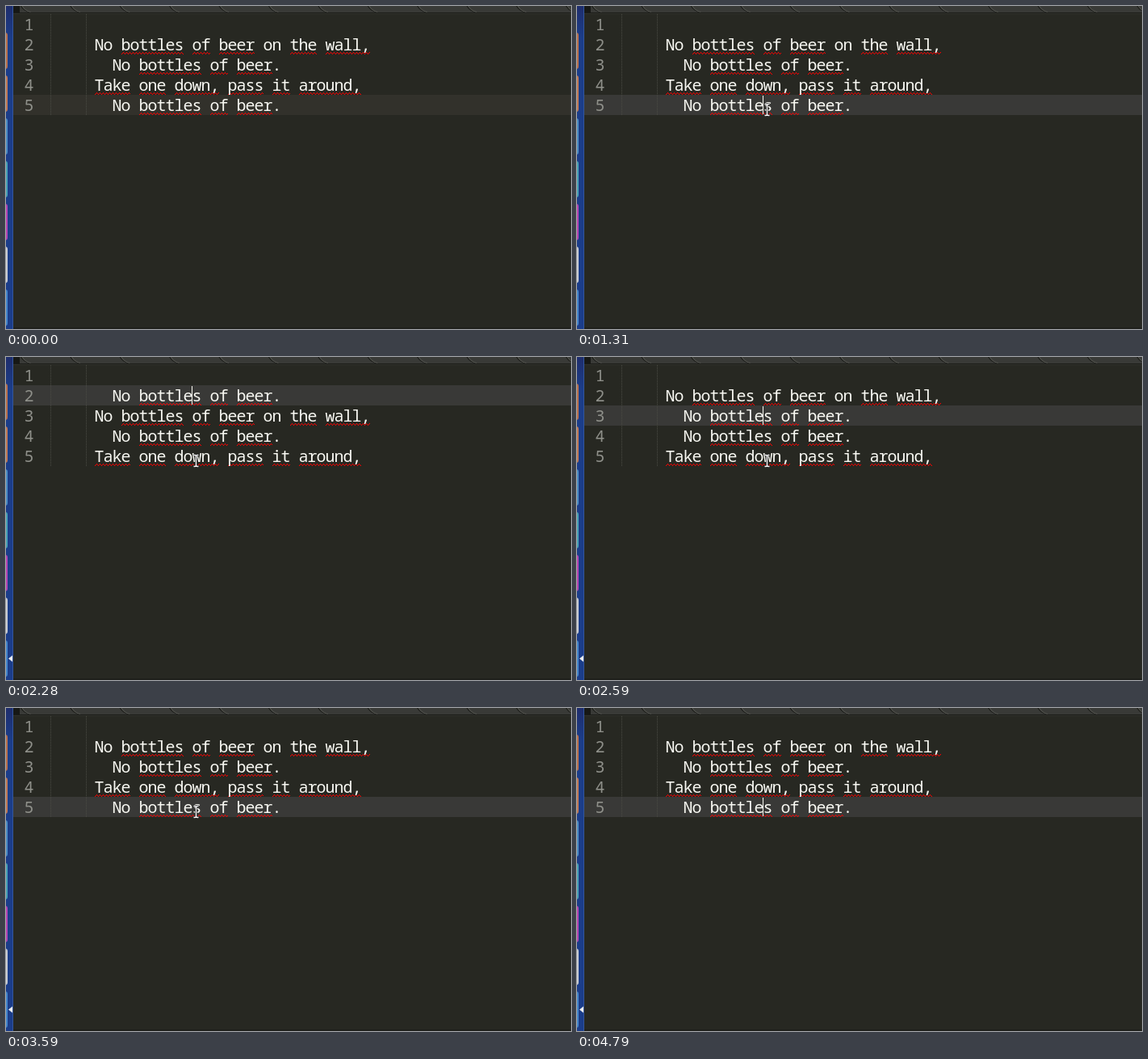
An HTML page with a canvas that plays this animation: 700 by 400 pixels, repeating every 4890 ms.

```html
<!DOCTYPE html>
<html lang="en">
<head>
<meta charset="utf-8">
<title>Moving a line</title>
<style>
html, body { margin: 0; width: 100%; height: 100%; overflow: hidden; background: #272822; }
canvas { display: block; }
</style>
</head>
<body>
<canvas id="stage" width="700" height="400"></canvas>
<script>
const ctx = document.getElementById('stage').getContext('2d');
const LOOP = 4890, CELL = 11, ROW = 25, TOP = 10, LEFT = 55;
const FOCUS = 1310, BADGE = 1400;

const chorus = { indent: 7, text: 'No bottles of beer.' };
const wall = { indent: 5, text: 'No bottles of beer on the wall,' };
const take = { indent: 5, text: 'Take one down, pass it around,' };
const others = [{ indent: 5, text: '' }, wall, chorus, take];

// [time, row of the moved line]; each entry restarts the caret blink
const moves = [[0, 4], [1400, 4], [1950, 3], [2170, 2], [2280, 1], [2590, 2], [2740, 3], [2920, 4]];

// [time, x, y] of the mouse pointer
const entering = [[400, 80, 373], [900, 248, 92], [940, 248, 92], [1260, 235, 128]];
const leaving = [[4045, 235, 128], [4610, 32, 375]];

const clamp = v => Math.max(0, Math.min(1, v));

function rect(color, x, y, w, h) {
  ctx.fillStyle = color;
  ctx.fillRect(x, y, w, h);
}

function follow(path, t) {
  const next = path.findIndex(p => p[0] > t);
  if (next < 1) return path[next ? path.length - 1 : 0].slice(1);
  const [a, b] = [path[next - 1], path[next]];
  const k = (t - a[0]) / (b[0] - a[0]);
  const e = k * k * (3 - 2 * k);
  return [1, 2].map(i => Math.round(a[i] + (b[i] - a[i]) * e));
}

function launcher(active) {
  const blue = ctx.createLinearGradient(0, 0, 0, 40);
  blue.addColorStop(0, '#1f2d6c');
  blue.addColorStop(1, '#1b3d8a');
  rect(blue, 0, 0, 9, 400);
  rect('#34579c', 8, 0, 1, 400);
  ['#b9714c', '#c07a55', '#4f8fc4', '#4aa3b5', '#b546b4', '#c9ccd2', '#4688cc'].forEach((color, i) => {
    ctx.fillStyle = color;
    ctx.beginPath();
    ctx.roundRect(-10, 33 + 53 * i, 12, 45, 3);
    ctx.fill();
  });
  if (active) {
    ctx.fillStyle = '#eee';
    ctx.beginPath();
    ctx.moveTo(3, 373.5);
    ctx.lineTo(8, 369.5);
    ctx.lineTo(8, 377.5);
    ctx.fill();
  }
}

function tabs() {
  rect('#393a37', 9, 0, 691, 8);
  rect('#171815', 9, 0, 8, 8);
  ctx.lineWidth = 1.2;
  for (let i = 0; i < 12; i++) {
    const x = 14 + i * 61.4;
    for (const [color, shift] of [['#191a17', 0], ['#50514c', 1.5]]) {
      ctx.strokeStyle = color;
      ctx.beginPath();
      ctx.moveTo(x + 4 + shift, -1);
      ctx.quadraticCurveTo(x + 8 + shift, 6, x + 15 + shift, 7.5);
      ctx.stroke();
    }
  }
  rect('#1b1c18', 9, 8, 691, 1);
  rect('#30312b', 9, 9, 691, 1);
}

function squiggle(x, y, width) {
  for (let i = 0; i < width; i++) rect('#f00', x + i, y + Math.abs(2 - i % 4), 1, 1);
}

function editor(row, focused) {
  rect('#272822', 9, 0, 691, 400);
  rect('#1f201c', 9, 398, 691, 2);
  rect(focused ? '#393937' : '#32312b', 9, TOP + row * ROW, 691, ROW);
  for (let y = TOP; y < TOP + 5 * ROW; y += 2) {
    for (const x of [LEFT, LEFT + 4 * CELL]) rect('#4a4b44', x, y, 1, 1);
  }
  const lines = [...others.slice(0, row), chorus, ...others.slice(row)];
  ctx.font = '500 20px "Noto Sans Mono", "DejaVu Sans Mono", monospace';
  ctx.letterSpacing = '-1px';
  lines.forEach(({ indent, text }, i) => {
    const x = LEFT + indent * CELL, y = TOP + i * ROW;
    for (const { 0: word, index } of text.matchAll(/\w+,?/g)) {
      if (!/^(no|on)$/i.test(word)) squiggle(x + index * CELL, y + 22, word.length * CELL);
    }
    ctx.fillStyle = '#f8f8f2';
    ctx.fillText(text, x - 0.5, y + 20);
    ctx.fillStyle = '#8f908a';
    ctx.fillText(i + 1, 22.5, y + 20);
  });
}

function caret(row, age) {
  ctx.globalAlpha = clamp(1 - (age - 240) / 430) + clamp((age - 1470) / 400);
  rect('#f8f8f0', 230, TOP + row * ROW + 1, 1, 23);
  ctx.globalAlpha = 1;
}

function pointer([left, top]) {
  const x = left + 0.5, y = top + 0.5;
  const beam = new Path2D(`M${x - 3} ${y - 7}h2l1 1l1 -1h2M${x} ${y - 6}v12M${x - 3} ${y + 7}h2l1 -1l1 1h2`);
  for (const [color, width] of [['#111', 2.6], ['#fff', 1.4]]) {
    ctx.strokeStyle = color;
    ctx.lineWidth = width;
    ctx.stroke(beam);
  }
}

function draw(now) {
  const t = now % LOOP;
  const [since, row] = moves.findLast(m => m[0] <= t);
  editor(row, t >= FOCUS);
  tabs();
  launcher(t >= BADGE);
  if (t >= FOCUS) caret(row, since ? t - since : 0);
  const step = 400 + Math.floor((t - 400) / 45) * 45;
  if (t >= 400 && t < 4650) pointer(follow(t < 2000 ? entering : leaving, step));
}

const start = performance.now();
function loop() {
  draw(performance.now() - start);
  requestAnimationFrame(loop);
}
loop();
</script>
</body>
</html>
```
